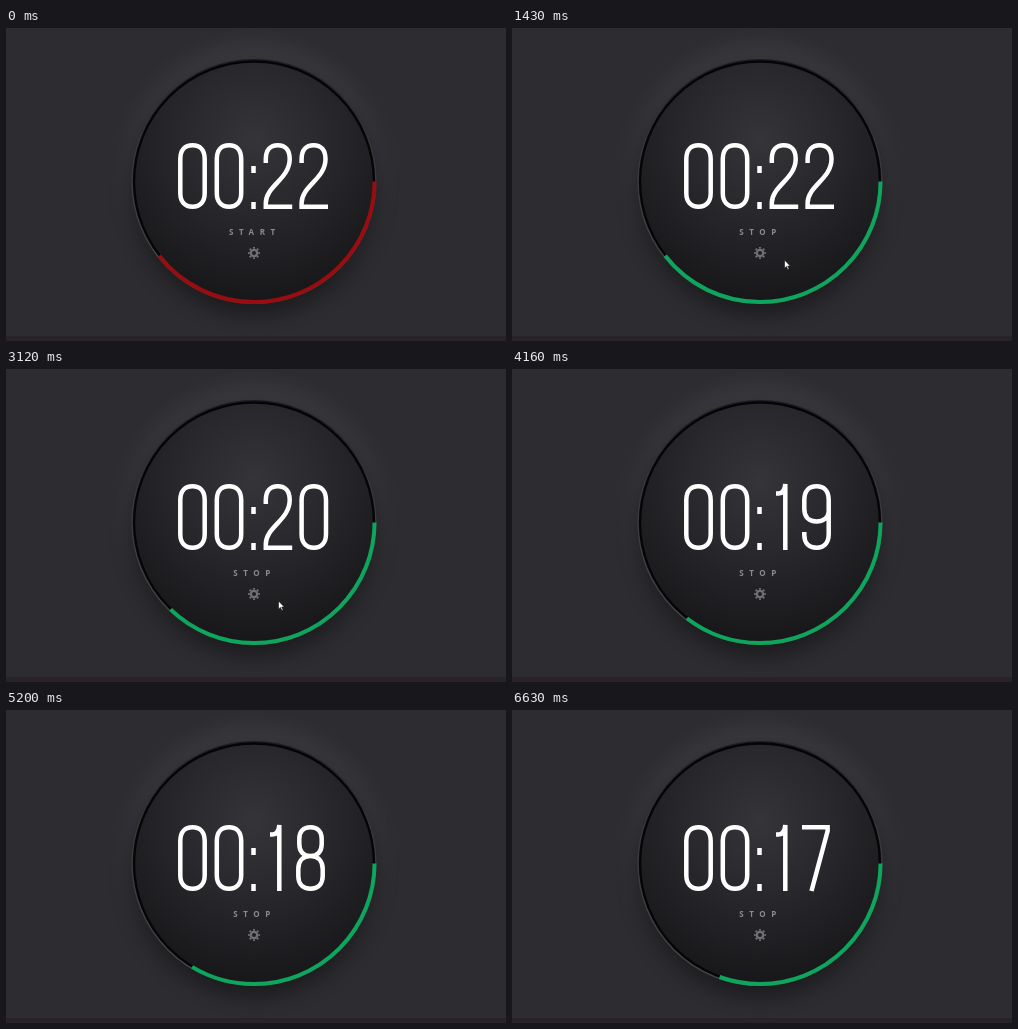
An HTML page for the animation above (6.76 s loop, 500 px wide and 313 px high).

```html
<!DOCTYPE html>
<html lang="en">
<head>
<meta charset="utf-8">
<title>Countdown timer</title>
<style>
  html, body { margin: 0; width: 100%; height: 100%; overflow: hidden; background: #2c2c31; }
  svg { display: block; width: 100vw; height: 100vh; }
  #label { font: 700 8px "Open Sans", Lato, sans-serif; letter-spacing: 5.6px; }
  #digits { fill: none; stroke: #fff; stroke-width: 4.5; }
</style>
</head>
<body>
<svg viewBox="0 0 500 313">
  <defs>
    <radialGradient id="face" gradientUnits="userSpaceOnUse" cx="248" cy="112" r="158">
      <stop offset="0" stop-color="#353539"/>
      <stop offset=".45" stop-color="#29292d"/>
      <stop offset="1" stop-color="#18181b"/>
    </radialGradient>
    <linearGradient id="rim" x1="0" y1="0" x2="0" y2="1">
      <stop offset="0" stop-color="#1c1c1f"/>
      <stop offset=".35" stop-color="#37373b"/>
      <stop offset="1" stop-color="#47474b"/>
    </linearGradient>
    <filter id="soft" x="-30%" y="-30%" width="160%" height="160%">
      <feGaussianBlur stdDeviation="11"/>
    </filter>
  </defs>

  <rect width="500" height="313" fill="#2c2c31"/>
  <circle cx="248" cy="145" r="128" fill="#fff" opacity=".07" filter="url(#soft)"/>
  <circle cx="248" cy="162" r="121" fill="#000" opacity=".55" filter="url(#soft)"/>
  <rect y="308" width="500" height="5" fill="#272326"/>

  <circle cx="248" cy="153.5" r="122.6" fill="url(#rim)"/>
  <circle cx="248" cy="153.5" r="120" fill="url(#face)" stroke="#050506" stroke-width="2.4"/>
  <circle id="arc" cx="248" cy="153.5" r="120.5" fill="none" stroke-width="4" pathLength="360"/>

  <g id="digits" role="img"></g>
  <text id="label" y="206.6"></text>
  <g id="gear" fill="none" transform="translate(248 225)">
    <circle r="3.2" stroke-width="2.3"/>
    <circle r="5.1" stroke-width="1.8" pathLength="16" stroke-dasharray="1 1" stroke-dashoffset=".5"/>
  </g>
  <path id="cursor" d="M0 0V8.2L1.9 6.4L3.3 9.4L4.6 8.8L3.2 6H5.8Z" fill="#fff" stroke="#111" stroke-width=".6"/>
</svg>

<script>
const STEP = 130, COUNT = 52;
const TICKS = [16, 24, 32, 40, 48];   // steps at which a second passes
const START_AT = 8;                   // step of the click
const DEG = 6.45;                     // arc degrees per second left

const GLYPHS = {
  0: "M2.3 16C2.3 7 7 2.3 14.5 2.3S26.7 7 26.7 16V50C26.7 59 22 63.7 14.5 63.7S2.3 59 2.3 50Z",
  1: "M0 9.6H2.5C7 9.6 8.8 6 9.3 0V66",
  2: "M2.3 20V16C2.3 7 6.8 2.3 14.3 2.3S26.2 7 26.2 16C26.2 36 2.3 43 2.3 60V63.7H28.7",
  7: "M0 2.3H25.6V6L9.5 66",
  8: "M14.5 31C7.5 31 3.3 27 3.3 19V14C3.3 6.5 7.5 2.3 14.5 2.3S25.7 6.5 25.7 14V19C25.7 27 21.5 31 14.5 31" +
     "C7 31 2.3 36 2.3 44V51C2.3 59 7 63.7 14.5 63.7S26.7 59 26.7 51V44C26.7 36 22 31 14.5 31Z",
  9: "M26.7 28C26 34 21 37.5 14.5 37.5C7 37.5 2.3 33 2.3 25V16C2.3 7 7 2.3 14.5 2.3S26.7 7 26.7 16V50" +
     "C26.7 59 22 63.7 14.5 63.7S2.3 59 2.3 51V48"
};

// Visible cursor runs: [step, x, y]
const RUNS = [
  [[2, 318, 256], [5, 256, 204], [8, 256, 204], [11, 272.5, 232], [24, 272.5, 232], [26, 292, 296]],
  [[42, 296, 262], [44, 260, 228.5], [45, 260, 228.5], [47, 296, 262]]
];
const LABEL_HOVER = [[3, 0], [5, 1], [8, 1], [11, 0]];
const GEAR_HOVER = [[42, 0], [44, 1], [45, 1], [48, 0]];

const $ = id => document.getElementById(id);
const clamp = v => Math.min(1, Math.max(0, v));
const ramp = (n, from) => clamp((n - from + 1) / 4);
const mix = (a, b, p) => `rgb(${a.map((v, i) => Math.round(v + (b[i] - v) * p))})`;

function track(keys, n, i = 1) {
  if (n <= keys[0][0]) return keys[0][i];
  for (let k = 1; k < keys.length; k++) {
    const a = keys[k - 1], b = keys[k];
    if (n <= b[0]) return a[i] + (b[i] - a[i]) * (n - a[0]) / (b[0] - a[0]);
  }
  return keys[keys.length - 1][i];
}

const glyph = (d, x) => `<path d="${GLYPHS[d]}" transform="translate(${x} 115)"/>`;

function drawTime(sec) {
  const [tens, units] = String(sec);
  $("digits").innerHTML = glyph(0, 172) + glyph(0, 208.5) +
    `<path d="M247.5 138v7M247.5 174v7"/>` +
    (tens === "1" ? glyph(1, 264) + glyph(units, 290) : glyph(2, 257.5) + glyph(units, 293.3));
  $("digits").setAttribute("aria-label", "00:" + sec);
}

function draw(n) {
  drawTime(22 - TICKS.filter(k => n >= k).length);

  const left = 22 - TICKS.reduce((sum, k) => sum + ramp(n, k), 0);
  $("arc").setAttribute("stroke-dasharray", `${left * DEG} 360`);
  $("arc").setAttribute("stroke", mix([153, 12, 16], [14, 165, 92], ramp(n, START_AT)));

  const running = n >= START_AT;
  $("label").textContent = running ? "STOP" : "START";
  $("label").setAttribute("x", running ? 227.2 : 222.9);
  $("label").setAttribute("fill", mix([139, 139, 143], [255, 255, 255], track(LABEL_HOVER, n)));
  $("gear").setAttribute("stroke", mix([112, 112, 116], [255, 255, 255], track(GEAR_HOVER, n)));

  const run = RUNS.find(r => n >= r[0][0] && n <= r[r.length - 1][0]);
  $("cursor").style.display = run ? "" : "none";
  if (run) $("cursor").setAttribute("transform", `translate(${track(run, n, 1)} ${track(run, n, 2)})`);
}

const t0 = performance.now();
let last = -1;
function frame() {
  const n = Math.floor((performance.now() - t0) / STEP) % COUNT;
  if (n !== last) draw(last = n);
  requestAnimationFrame(frame);
}
frame();
</script>
</body>
</html>
```
